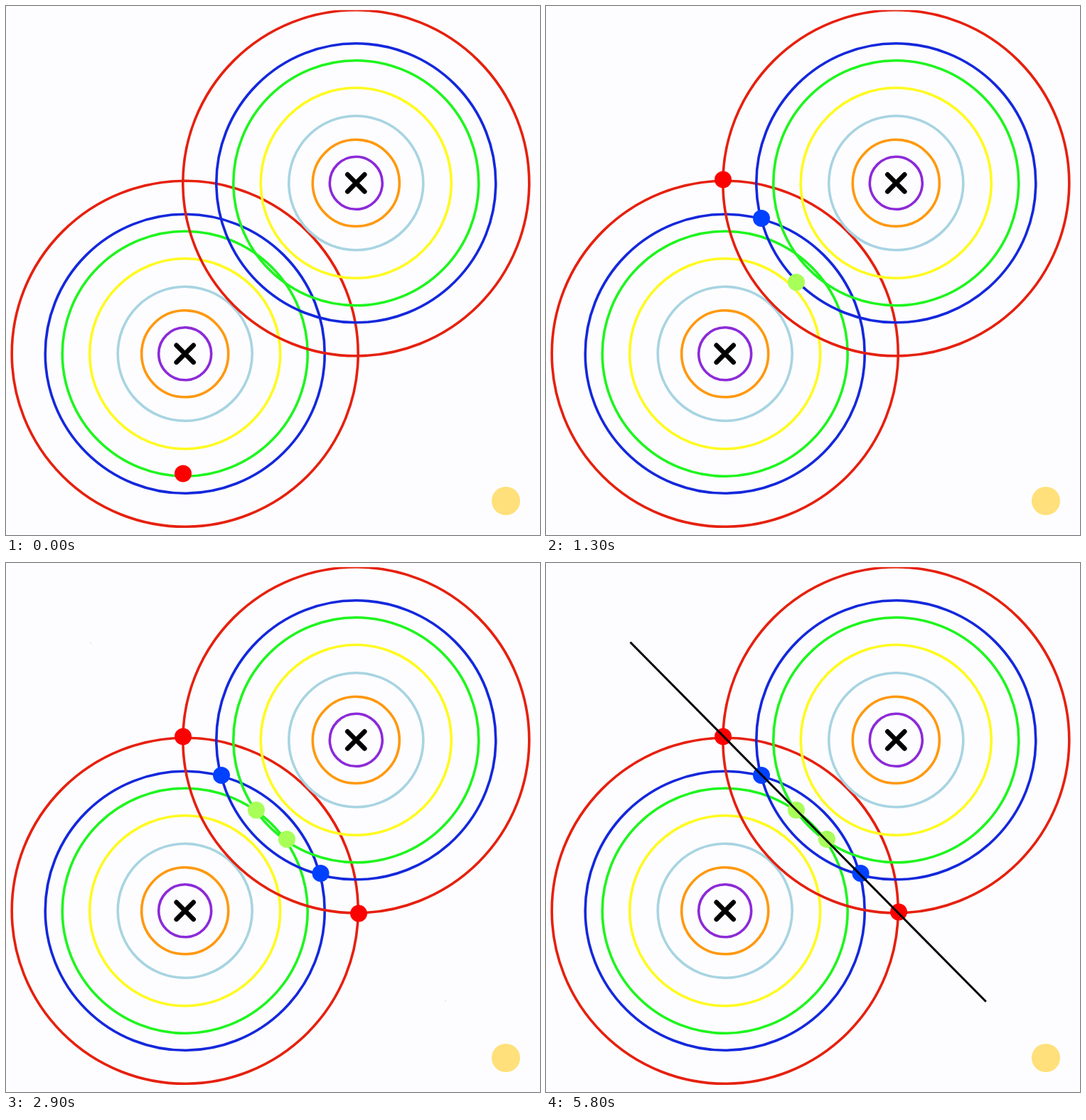
Animation, 751 px wide and 745 px high, one loop 5900 ms. Source, as an HTML page:

```html
<!DOCTYPE html>
<html lang="en">
<head>
<meta charset="utf-8">
<title>Equidistant points</title>
<style>
  html, body { margin: 0; width: 100%; height: 100%; overflow: hidden; background: #fdfdff; }
  svg { display: block; width: 751px; height: 745px; }
  .rings { fill: none; stroke-width: 3.6; }
  .cross { stroke: #000; stroke-width: 6.6; stroke-linecap: round; }
  .half { fill: none; stroke-width: 3; }
</style>
</head>
<body>
<svg viewBox="0 0 751 745">
  <defs>
    <clipPath id="top"><rect y="5.8" width="751" height="740"/></clipPath>
    <linearGradient id="left" gradientUnits="userSpaceOnUse" y1="0" y2="0">
      <stop offset="0"/><stop offset="1" stop-opacity="0"/>
    </linearGradient>
    <linearGradient id="right" gradientUnits="userSpaceOnUse" y1="0" y2="0">
      <stop offset="0"/><stop offset="1" stop-opacity="0"/>
    </linearGradient>
  </defs>
  <g id="waves" clip-path="url(#top)"></g>
  <circle cx="703" cy="697" r="20" fill="#ffe07a"/>
  <g id="dots"></g>
  <path class="half" stroke="url(#left)" d="M118.5 111.5L368.7 364.7"/>
  <path class="half" stroke="url(#right)" d="M618.8 617.8L368.3 364.3"/>
</svg>
<script>
const LOOP = 5900, STEP = 100, FLIGHT = 500, BELOW = 757;
const $ = id => document.getElementById(id);

function add(parent, tag, attrs) {
  const el = document.createElementNS('http://www.w3.org/2000/svg', tag);
  for (const key in attrs) el.setAttribute(key, attrs[key]);
  return parent.appendChild(el);
}

const rings = [
  [243.5, '#e6200e'], [196.5, '#1428dc'], [172.5, '#1ef51e'], [134, '#fffa1e'],
  [94.5, '#a8d4e2'], [61, '#ff980e'], [37, '#8c2ad8']
];

for (const [x, y] of [[251.7, 489.8], [492.3, 249.3]]) {
  const g = add($('waves'), 'g', { class: 'rings', transform: `translate(${x} ${y})` });
  for (const [r, stroke] of rings) add(g, 'circle', { r, stroke });
  add(g, 'path', { class: 'cross', d: 'M-12-12L12 12M12-12L-12 12' });
}

const RED = '#fc0000', BLUE = '#0040ff', LIME = '#a8ff58';

// x, resting y, colour, start of flight in ms
const dots = [
  [249, 244.5, RED, -96], [303, 299, BLUE, 402], [352, 348, LIME, 850],
  [395, 389, LIME, 1400], [442.5, 437, BLUE, 1934], [496, 491.5, RED, 2404]
].map(([cx, rest, fill, start]) => ({
  rest, start, el: add($('dots'), 'circle', { cx, cy: BELOW, r: 12, fill })
}));

function setFade(id, solid, clear) {
  $(id).setAttribute('x1', solid);
  $(id).setAttribute('x2', clear);
}

function draw(t) {
  for (const { el, rest, start } of dots) {
    const p = Math.min(1, Math.max(0, (t - start) / FLIGHT));
    el.setAttribute('cy', BELOW + (rest - BELOW) * p);
  }
  // the line is wiped in from both ends with a soft edge
  const reach = (t - 2880) * 0.142;
  setFade('left', 78.5 + reach, 118.5 + reach);
  setFade('right', 658.8 - reach, 618.8 - reach);
}

const begin = performance.now();
function tick() {
  const t = (performance.now() - begin + 8) % LOOP;
  draw(Math.floor(t / STEP) * STEP);
  requestAnimationFrame(tick);
}
tick();
</script>
</body>
</html>
```
